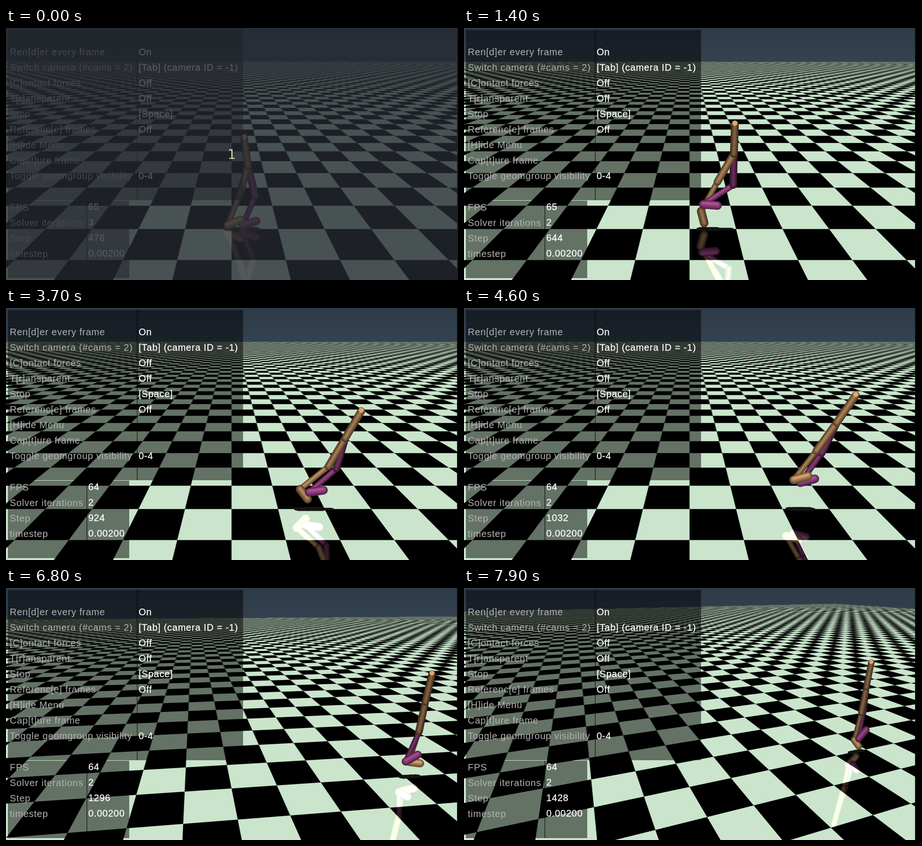
Write an HTML page with a canvas that moves like this. It is 961 px wide and 537 px high and loops after 8000 ms.

```html
<!DOCTYPE html>
<html lang="en">
<head>
<meta charset="utf-8">
<title>Walker simulation</title>
<style>
html, body { margin: 0; width: 961px; height: 537px; overflow: hidden; background: #000; }
canvas, svg { position: absolute; left: 0; top: 0; display: block; }
text { font: 20px "Liberation Sans", Arial, sans-serif; letter-spacing: .75px; white-space: pre; }
.label { fill: #b2b2b2; }
.value { fill: #fff; stroke: #fff; stroke-width: .3px; }
#title text { font: 28px "DejaVu Sans", sans-serif; letter-spacing: 0; fill: #f0f0c8; text-anchor: middle; }
</style>
</head>
<body>
<canvas id="scene" width="961" height="537"></canvas>
<svg id="hud" width="961" height="537">
  <g fill="#000" fill-opacity=".5">
    <rect x="4" y="4" width="276" height="363"/>
    <rect x="278" y="4" width="226" height="363"/>
    <rect x="4" y="368" width="169" height="165"/>
    <rect x="171" y="368" width="91" height="165"/>
  </g>
  <g id="rows"></g>
  <g id="title">
    <rect width="961" height="537" fill="rgb(38,42,49)"/>
    <text x="480" y="279">1</text>
  </g>
</svg>
<script>
const W = 961, H = 537, LOOP = 8000, STEP = 100;
const CX = 479.5, CY = 268, FOCAL = 652;
const DIST = 6, LOOK_Z = 1.725, EDGE = 60; // lengths in floor tiles
const RAD = Math.PI / 180;

const TAN = [204, 153, 102], PURPLE = [178, 77, 153];

// time, azimuth, elevation
const CAMERA = [
  [6500, 0, 20], [7200, 15.4, 21.65], [7300, 15.4, 21.65], [7900, 19.4, 22.6]
];
// time, screen x and y of the top of the torso
const HEAD = [
  [0, 506, 234], [700, 538, 225], [1400, 576, 205], [1800, 602, 192], [2000, 615, 190],
  [2700, 664, 209], [2800, 671, 212], [3300, 717, 224], [3600, 746, 222], [4100, 792, 208],
  [4600, 833, 186], [5000, 858, 176], [5400, 878, 179], [5900, 895, 207], [6300, 912, 205],
  [7300, 878, 160], [7900, 866, 159]
];
// time, torso, then thigh, shin and foot of the near and the far leg; degrees from straight down
const POSE = [
  [0, 8.5, -14.5, -18.7, 116, 13.7, -19.2, 110],
  [1400, 1, -26.7, -25.4, 13.5, 1.6, -53.6, 85],
  [2800, -13.4, -31.6, -27.6, 26, -11.4, -22.3, 117],
  [3300, -20, -22, -48, 10, -5, -45, 100],
  [4600, -26.4, -27.6, -30, 107, -17.2, -27, 107],
  [5900, -10, -10.2, -9.8, 131, -8.5, -11, 134],
  [7300, 4, 5, -4, 48, 7, -11.5, 117],
  [7900, 2.3, 2.3, -2, 44, 8, 4, 141]
];

const clamp = (v, a, b) => Math.min(b, Math.max(a, v));
const mix = (a, b, k) => a + (b - a) * k;

// Linear or cubic interpolation through a table of [time, ...values]
function sample(rows, t, smooth) {
  const last = rows.length - 1;
  t = clamp(t, rows[0][0], rows[last][0]);
  let i = 0;
  while (i < last - 1 && t >= rows[i + 1][0]) i++;
  const a = rows[i], b = rows[i + 1], span = b[0] - a[0], k = (t - a[0]) / span;
  const before = rows[Math.max(0, i - 1)], after = rows[Math.min(last, i + 2)];
  return a.slice(1).map((v, n) => {
    const c = n + 1;
    if (!smooth) return mix(v, b[c], k);
    const m0 = (b[c] - before[c]) / (b[0] - before[0]) * span;
    const m1 = (after[c] - v) / (after[0] - a[0]) * span;
    const k2 = k * k, k3 = k2 * k;
    return (2 * k3 - 3 * k2 + 1) * v + (k3 - 2 * k2 + k) * m0
      + (3 * k2 - 2 * k3) * b[c] + (k3 - k2) * m1;
  });
}

function cameraAt(t) {
  const [azimuth, elevation] = sample(CAMERA, t, false);
  const s = Math.sin(azimuth * RAD), c = Math.cos(azimuth * RAD);
  const se = Math.sin(elevation * RAD), ce = Math.cos(elevation * RAD);
  const fwd = [s * ce, c * ce, -se];
  return {
    key: azimuth + "/" + elevation,
    fwd,
    right: [c, -s, 0],
    down: [-s * se, -c * se, -ce],
    pos: [-DIST * fwd[0], -DIST * fwd[1], LOOK_Z - DIST * fwd[2]]
  };
}

const dot = (a, b) => a[0] * b[0] + a[1] * b[1] + a[2] * b[2];

function project(cam, x, y, z) {
  const d = [x - cam.pos[0], y - cam.pos[1], z - cam.pos[2]];
  const depth = dot(d, cam.fwd);
  return {
    x: CX + FOCAL * dot(d, cam.right) / depth,
    y: CY + FOCAL * dot(d, cam.down) / depth,
    depth
  };
}

// Screen point to the walker's plane, y = 0
function unproject(cam, px, py) {
  const X = (px - CX) / FOCAL, Y = (py - CY) / FOCAL;
  const dir = [0, 1, 2].map(i => cam.fwd[i] + cam.right[i] * X + cam.down[i] * Y);
  const k = -cam.pos[1] / dir[1];
  return [cam.pos[0] + k * dir[0], cam.pos[2] + k * dir[2]];
}

const ROOT = HEAD.map(([t, x, y]) => [t, ...unproject(cameraAt(t), x, y)]);

const scene = document.getElementById("scene");
const g = scene.getContext("2d");
function layer() {
  const c = document.createElement("canvas");
  c.width = W;
  c.height = H;
  return c;
}
const floorLayer = layer(), mirrorLayer = layer();
const floorCtx = floorLayer.getContext("2d"), mirrorCtx = mirrorLayer.getContext("2d");
const pixels = floorCtx.createImageData(W, H);
let floorKey = "";

// Square wave of period 2 averaged over width w
const ramp = x => 1 - Math.abs(x - 2 * Math.floor(x / 2) - 1);
const wave = (x, w) => (ramp(x + w / 2) - ramp(x - w / 2)) / w;

function groundRow(cam, y) {
  const Y = (y + .5 - CY) / FOCAL;
  const drop = -(cam.fwd[2] + cam.down[2] * Y);
  if (drop <= .001) return null;
  const k = cam.pos[2] / drop;
  const at = i => cam.pos[i] + k * (cam.fwd[i] + cam.down[i] * Y + cam.right[i] * (.5 - CX) / FOCAL);
  return { u: at(0), v: at(1), du: k * cam.right[0] / FOCAL, dv: k * cam.right[1] / FOCAL };
}

function paintFloor(cam) {
  if (cam.key === floorKey) return;
  floorKey = cam.key;
  const data = pixels.data;
  let o = 0;
  for (let y = 0; y < H; y++) {
    const row = groundRow(cam, y), next = groundRow(cam, y + 1);
    const sky = [mix(45, 52, y / 72), mix(58, 67, y / 72), mix(71, 82, y / 72)];
    for (let x = 0; x < W; x++, o += 4) {
      let r = sky[0], gr = sky[1], b = sky[2];
      if (row) {
        const u = row.u + x * row.du, v = row.v + x * row.dv;
        if (Math.abs(u) < EDGE && Math.abs(v) < EDGE) {
          const wu = 1.15 * Math.hypot(row.du, next.u + x * next.du - u) + 1e-4;
          const wv = 1.15 * Math.hypot(row.dv, next.v + x * next.dv - v) + 1e-4;
          // distant texture blurs in both directions
          const wide = Math.max(wu, wv);
          const k = .5 + .5 * wave(u, mix(wu, wide, .55)) * wave(v, mix(wv, wide, .55));
          r = 202 * k; gr = 229 * k; b = 204 * k;
        }
      }
      data[o] = r; data[o + 1] = gr; data[o + 2] = b; data[o + 3] = 255;
    }
  }
  floorCtx.putImageData(pixels, 0, 0);
}

function walkerAt(t, cam) {
  const [x, z] = sample(ROOT, t, true);
  const [torso, nThigh, nShin, nFoot, fThigh, fShin, fFoot] = sample(POSE, t, true);
  const part = (from, angle, length, r, color) => {
    const s = Math.sin(angle * RAD), c = Math.cos(angle * RAD);
    const b = [from[0] + length * s, from[1] - length * c];
    const depth = project(cam, (from[0] + b[0]) / 2, 0, (from[1] + b[1]) / 2).depth;
    return { a: from, b, r, color, depth, flat: Math.abs(s) };
  };
  const body = part([x, z], torso, .6, .075, TAN);
  const leg = (color, thighA, shinA, footA) => {
    const thigh = part(body.b, thighA, .675, .075, color);
    const shin = part(thigh.b, shinA, .75, .06, color);
    return [thigh, shin, part(shin.b, footA, .3, .09, color)];
  };
  const near = leg(TAN, nThigh, nShin, nFoot), far = leg(PURPLE, fThigh, fShin, fFoot);
  body.cap = true;
  // in one plane, thick parts cover thin ones, then close ones cover distant ones
  return {
    parts: [...far, ...near, body].sort((p, q) => p.r - q.r || q.depth - p.depth),
    low: [far[1], near[1], far[2], near[2]]
  };
}

const shade = (c, k) => `rgb(${c.map(v => Math.min(255, Math.round(v * k)))})`;

function drawPart(ctx, cam, p, side) {
  const a = project(cam, p.a[0], 0, side * p.a[1]);
  const b = project(cam, p.b[0], 0, side * p.b[1]);
  const width = 4 * p.r * FOCAL / (a.depth + b.depth);
  const light = .59 + .42 * p.flat - (p.color === PURPLE ? .06 : 0);
  ctx.lineCap = "round";
  for (let i = 0; i < 5; i++) {
    const lift = i * width * .045 * p.flat * side;
    ctx.strokeStyle = shade(p.color, light * (.5 + .14 * i));
    ctx.lineWidth = width * (1 - .2 * i);
    ctx.beginPath();
    ctx.moveTo(a.x, a.y - lift);
    ctx.lineTo(b.x, b.y - lift);
    ctx.stroke();
  }
  if (p.cap) {
    ctx.fillStyle = shade(p.color, 1.1);
    ctx.beginPath();
    ctx.arc(a.x, a.y - side * width * .13, width * .33, 0, 7);
    ctx.fill();
  }
}

function drawShadow(cam, p) {
  const x0 = Math.min(p.a[0], p.b[0]) - p.r, x1 = Math.max(p.a[0], p.b[0]) + p.r;
  const d = p.r * .8;
  g.beginPath();
  for (const [x, y] of [[x0, -d / 2], [x0 + d, -d], [x1 - d, -d], [x1, -d / 2], [x1, d / 2], [x1 - d, d], [x0 + d, d], [x0, d / 2]]) {
    const q = project(cam, x, y, 0);
    g.lineTo(q.x, q.y);
  }
  g.fill();
}

function drawScene(t) {
  const cam = cameraAt(t), walker = walkerAt(t, cam);
  paintFloor(cam);
  g.drawImage(floorLayer, 0, 0);

  g.fillStyle = "rgb(18,21,16)";
  walker.low.forEach(p => drawShadow(cam, p));

  mirrorCtx.clearRect(0, 0, W, H);
  walker.parts.forEach(p => drawPart(mirrorCtx, cam, p, -1));
  g.save();
  g.globalCompositeOperation = "lighter";
  g.globalAlpha = .52;
  g.drawImage(mirrorLayer, 0, 0);
  g.restore();

  walker.parts.forEach(p => drawPart(g, cam, p, 1));
  g.fillStyle = "#05060a";
  g.fillRect(959, 0, 2, H);
}

const rows = document.getElementById("rows");
function addText(x, y, text, kind) {
  const el = document.createElementNS("http://www.w3.org/2000/svg", "text");
  el.setAttribute("x", x);
  el.setAttribute("y", y);
  el.setAttribute("class", kind);
  el.textContent = text;
  rows.append(el);
  return el;
}

[
  ["Ren[d]er every frame", "On"],
  ["Switch camera (#cams = 2)", "[Tab] (camera ID = -1)"],
  ["[C]ontact forces", "Off"],
  ["T[r]ansparent", "Off"],
  ["Stop", "[Space]"],
  ["Referenc[e] frames", "Off"],
  ["[H]ide Menu", ""],
  ["Cap[t]ure frame", ""],
  ["Toggle geomgroup visibility", "0-4"]
].forEach(([label, value], i) => {
  addText(8, 58 + 33 * i, label, "label");
  addText(282, 58 + 33 * i, value, "value");
});

const [fps, solver, counter] = ["FPS", "Solver iterations", "Step", "timestep"].map((label, i) => {
  addText(8, 389 + 33 * i, label, "label");
  return addText(175, 388 + 33 * i, "0.00200", "value");
});
const title = document.getElementById("title");

function draw(n) {
  const t = n * STEP;
  drawScene(t);
  fps.textContent = t < 2000 ? 65 : t < 3600 ? 66 : 64;
  solver.textContent = t < 400 ? 3 : 2;
  counter.textContent = 476 + 12 * n + (n >= 36 ? 4 : 0);
  title.setAttribute("opacity", clamp(.78 * (1 - t / 600), 0, 1));
}

const start = performance.now();
let shown = -1;
function tick() {
  const n = Math.floor(Math.max(0, performance.now() - start) % LOOP / STEP);
  if (n !== shown) draw(shown = n);
  requestAnimationFrame(tick);
}
tick();
</script>
</body>
</html>
```
